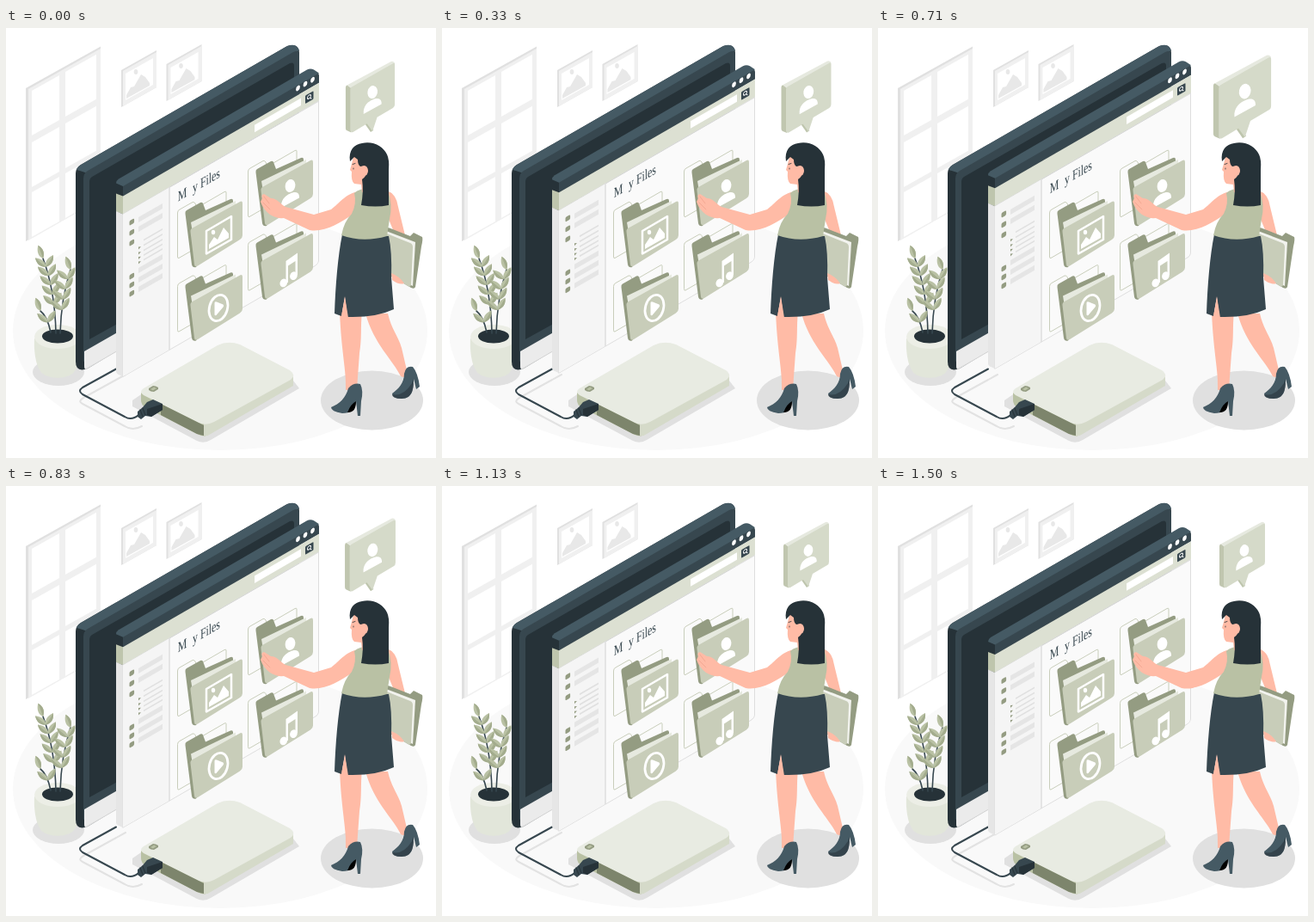
Recreate the animation shown at these times as an HTML page. Size 500 by 500 pixels, loop 1.54 s.

```html
<!DOCTYPE html>
<html lang="en">
<head>
<meta charset="utf-8">
<title>My Files</title>
<style>
  html, body { margin: 0; width: 100%; height: 100%; overflow: hidden; background: #fff; }
  svg { display: block; width: 100vw; height: 100vh; }
  .ink { fill: #263238; } .slate { fill: #37474f; } .steel { fill: #455a64; }
  .sage { fill: #b9c1a4; } .moss { fill: #949c82; } .pale { fill: #c8cdb9; } .cream { fill: #dce0d2; }
  .skin { fill: #ffbba6; } .shade { fill: #e0e0e0; } .mist { fill: #f0f0f0; } .white { fill: #fff; }
  .line { fill: none; stroke-linecap: round; stroke-linejoin: round; }
  text { font: 16.5px "Liberation Serif", serif; fill: #37474f; }
</style>
</head>
<body>
<svg viewBox="0 0 500 500">
  <defs>
    <g id="picture">
      <path class="shade" d="M134 49L175 26V69L134 92Z"/>
      <path class="mist" d="M136 50L175 28V69L136 91Z"/>
      <path class="white" d="M139 53L171 35V66L139 84Z"/>
      <path fill="#e8e8e8" d="M140 82V78L145 69L149 68L157 54L162 57L167 64V67Z"/>
      <ellipse fill="#e8e8e8" cx="151" cy="51" rx="2.3" ry="2.9"/>
    </g>
    <g id="folder">
      <path class="line" stroke="#c3c9b4" stroke-width=".9" d="M214 260L201 267.5Q199.500 268 199.500 266V215Q199.500 212 202 211L217 202.500Q219 202 220 204L222 209L254 190.500Q256 189.500 256 191V206"/>
      <path class="moss" d="M208.500 216Q208 213 210 212L226 203Q228 202 229 204L232 212L261 199Q264 198 264 201V212L221 278Q217 279 216 275Z"/>
      <path fill="#e6e9df" d="M215 226L267 201V210L218 244Z"/>
      <path class="pale" d="M214.500 237Q214 234 217 232.500L272 202Q275 200.500 275 204V241Q275 244 272 246L223 276.500Q219.500 278.500 219 275Z"/>
    </g>
    <g id="person" class="white">
      <ellipse rx="5.800" ry="7.600" transform="rotate(12)"/>
      <path d="M-10.500 25.500V22C-9.500 15 -5 11 0 9C5 6.500 10 7 10.500 12V14Z"/>
    </g>
    <g id="leaf">
      <path fill="#b9c1a4" d="M0 0C3 -5 9 -6 16 -3C11 3 5 3 0 0Z"/>
      <path fill="#a3ac8d" d="M0 0Q8 -1 16 -3C11 3 5 3 0 0Z"/>
    </g>
  </defs>

  <ellipse cx="249" cy="352" rx="241" ry="139" fill="#f9f9f9"/>

  <!-- wall -->
  <path class="shade" d="M23 70L110 21.500V199L23 248Z"/>
  <path class="mist" d="M26 71L110 24V199L26 247Z"/>
  <g id="panes" class="white"></g>
  <use href="#picture"/>
  <use href="#picture" x="52.500" y="-7"/>

  <!-- plant -->
  <ellipse cx="61" cy="400" rx="30" ry="16" class="shade"/>
  <path fill="#e2e6da" d="M33 361C32 380 36 400 46 404Q60 410 74 404C84 400 88 380 87 361Z"/>
  <ellipse cx="60" cy="359" rx="27" ry="14" fill="#eceee6"/>
  <ellipse cx="60" cy="358.500" rx="18" ry="8" class="ink"/>
  <g id="plant" class="line"></g>

  <!-- monitor -->
  <path class="ink" d="M81 169Q81 163 87 159L327 21Q341 17 341 30V240L128 376L95 396Q81 401 81 388Z"/>
  <path class="steel" d="M82 165Q83 161 87 159L327 21Q338 17 341 26L94 169Q90 167 82 165Z"/>
  <path class="slate" d="M90 175Q90 169 95 166L334 28Q341 25 341 31V240L90 388Z"/>
  <path class="ink" d="M97 179Q97 175 100 173L330 41Q335 39 335 44V230L97 362Z"/>
  <path fill="#ebebeb" d="M91 376L140 348V369L95 396Q91 398 91 394Z"/>
  <path class="line" stroke="#d8d8d8" d="M92 397L140 369.500"/>

  <!-- cable -->
  <g class="line">
    <path stroke="#e2e2e2" stroke-width="2" d="M139 403L90 430Q83 434 89 437L138 463Q147 469 158 463"/>
    <path stroke="#37474f" stroke-width="2" d="M128 396.500L89 418Q83 422 89 426L138 452Q146 457 154 450"/>
  </g>

  <g id="browser">
    <path class="ink" d="M128 180L136 184V196.500L128 193Z"/>
    <path fill="#bec5ad" d="M128 193L136 196V217L128 214Z"/>
    <path fill="#e6e6e6" d="M128 213.500L136 217V406L130 403Q128 402 128 400Z"/>
    <g transform="translate(136 182) skewY(-30)">
      <path class="slate" d="M0 0H223Q228 1 228 6V14H0Z"/>
      <path class="cream" d="M0 14H228V35H0Z"/>
      <path fill="#fafafa" stroke="#dedede" d="M0 35H227.500V220Q227.500 224 223 224H0Z"/>
      <path fill="#f5f5f5" d="M0 35H54V223.500H0Z"/>
      <path class="line" stroke="#dedede" stroke-width="1.500" d="M54 35V223.500"/>
      <rect class="white" x="153" y="19.500" width="54" height="8.500"/>
      <rect class="slate" x="212" y="19.500" width="9.500" height="9.500" rx="1"/>
      <path class="line" stroke="#fff" d="M217.500 25L219 27M214.500 23.500a2 2 0 1 1 4 0a2 2 0 1 1 -4 0"/>
      <g class="white">
        <ellipse cx="203.500" cy="6" rx="2.400" ry="3"/>
        <ellipse cx="212" cy="6" rx="2.400" ry="3"/>
        <ellipse cx="220.500" cy="6" rx="2.400" ry="3"/>
      </g>
      <g id="sidebar"></g>
      <g transform="scale(.72 1)"><text x="88.500" y="57">M</text><text x="112.500" y="57">y Files</text></g>
    </g>
    <path class="steel" d="M128 181Q128 178 131 176L350 49Q354 47 358 49L364 53L136 184.500Z"/>
  </g>

  <!-- folders -->
  <use href="#folder"/>
  <use href="#folder" x="82" y="-48"/>
  <use href="#folder" y="85.500"/>
  <use href="#folder" x="82" y="37.500"/>
  <path class="line" stroke="#fff" stroke-width="2.500" d="M233 236L262 219V246L233 262.500Z"/>
  <path class="white" d="M236 257V252L242 243L246 246L253 232L259 239V244Z"/>
  <ellipse class="white" cx="241" cy="237.500" rx="2.200" ry="2.700"/>
  <use href="#person" x="330.500" y="183.500"/>
  <ellipse class="line" stroke="#fff" stroke-width="2.800" cx="247" cy="325.500" rx="10.500" ry="15.500" transform="rotate(16 247 325.500)"/>
  <path class="white" d="M242.500 320Q242.500 317.500 245 318.500L252.500 321.500Q254 323 252.500 324.500L244.500 334Q242.500 335 242.500 333Z"/>
  <path class="white" d="M325.500 271L339 261.500V287H336.500V271L328 276.500V296H325.500Z"/>
  <ellipse class="white" cx="323" cy="296.500" rx="4.200" ry="5" transform="rotate(25 323 296)"/>
  <ellipse class="white" cx="334.500" cy="288" rx="4.200" ry="5" transform="rotate(25 334 288)"/>

  <!-- drive -->
  <path class="shade" d="M147 433L160 424L334 410L341 419L238 479Q230 484 222 480L147 440Z"/>
  <path class="sage" d="M157 424L232 459V474.500Q228 475 222 472L162 441Q157 438 157 433Z"/>
  <path fill="#d5dac9" d="M230 459L334 404V416L238 472Q234 475 230 474.500Z"/>
  <path fill="#e8ebe2" d="M160 427Q154 423 160 419L246 369Q258 363 272 368L330 398Q338 404 331 409L242 458Q232 463 224 459Z"/>
  <path fill="#7d856c" d="M180 437L230 462V474L222 472L180 450Z"/>
  <path class="moss" d="M166 419L171 416Q174 416 177 418V420L172 423Q168 423 166 421Z"/>
  <path class="sage" d="M168 420L172 417.500L175 419L171 421.500Z"/>
  <path class="slate" d="M153 446L159 441L164 435L171 432L182 437V444L169 452L162 451L157 455L153 452Z"/>
  <path class="ink" d="M164 443L182 437V444L169 452L164 450Z"/>
  <path class="line" stroke="#263238" d="M156 444L159 452M159 442L162 450"/>

  <!-- woman -->
  <ellipse cx="425.500" cy="433" rx="59.500" ry="34.500" class="shade"/>
  <path class="skin" d="M418 332H444C448 350 456 358 460 372L467 402Q464 408 459 405C450 386 428 368 418 332Z"/>
  <path class="skin" d="M388 330H414C412 348 414 360 411 378L408 420L395 421C396 398 390 378 388 330Z"/>
  <path class="steel" d="M449 425C456 420 463 413 463 402Q465 392 473 394Q479 401 481 417L477 420L474 408C474 419 473 431 460 431Q449 431 449 425Z"/>
  <path class="ink" d="M449 426Q462 429 472 413L474 408C474 419 473 431 460 431Q449 431 449 426Z" opacity=".55"/>
  <path class="steel" d="M378 441C388 437 395 430 398 419Q404 412 412 414Q416 422 413 434L412 451H409L407 434C405 445 401 448 391 448Q378 446 378 441Z"/>
  <path fill="#000" d="M397 447Q401 437 407 434C407 443 404 447 397 447Z"/>
  <path class="skin" d="M443 189Q454 193 456 208L464 241L455 247L442 215Z"/>
  <path class="moss" d="M441 235Q443 231 447 233L470 242L474 238L484 243Q485 246 483 254L476 301Q475 304 471 302L447 288Z"/>
  <path fill="#f2f3ee" d="M442 236L476 249L473 300L447 287Z"/>
  <path class="pale" d="M440 238L470 250Q473 251 473 255L471 299Q470 302 467 300L446 286Z"/>
  <path class="skin" d="M448 285Q458 289 463 297Q457 299 449 293Z"/>
  <path class="slate" d="M391 240L445 242Q449 260 448 290L451 327Q430 337 397 336L394 313L390 335L382 332C383 300 386 264 391 240Z"/>
  <path class="skin" d="M394 312L398 337L390 335Z"/>
  <path class="skin" d="M414 190C396 190 388 204 378 211L358 217L325 208C318 204 315 198 308 198L300 193Q296 194 298 198L296 202Q299 211 307 217Q315 222 323 221L353 235C370 238 388 227 404 216Q408 203 414 190Z"/>
  <path class="sage" d="M412 188Q430 181 444 189Q450 206 446 222L443 242Q415 250 390 241Q393 225 402 216Q408 204 405 192Q408 189 412 188Z"/>
  <path class="line" stroke="#f0a18c" stroke-width=".7" d="M300 196L306 204M299 203L307 211"/>
  <path class="skin" d="M404 150L402 158L400 165L402 167Q401 178 405 181L413 182L414 191L424 190V158L414 148Z"/>
  <path class="ink" d="M400 155C398 142 405 135 414 134C427 131 439 138 443 147Q446 153 445 165V206Q430 209 413 206Q416 190 414 176Q419 173 420 165Q418 159 412 161Q409 159 409 153L405 150Z"/>
  <ellipse class="skin" cx="416.500" cy="166" rx="4.500" ry="6"/>
  <path class="line" stroke="#263238" stroke-width=".8" d="M403 158.500L406 157.500M404 163V164"/>

  <g id="bubble">
    <path fill="#c0c6af" d="M397 70Q397 68 398.500 67.500L403 70V118.500L398.500 116.500Q397 116 397 114Z"/>
    <path fill="#e6e9df" d="M398.500 67.500L446 42Q448 41 450 43.500L403 71Z"/>
    <path fill="#bec5ad" d="M417 108L424 118L427 116L422 106Z"/>
    <path fill="#d5dac9" d="M402 72Q402 70 404 69L448 44Q450 43 450 45V88Q450 91 448 92L431 102L426 117L420 109L405 118Q402 119 402 116Z"/>
    <use href="#person" transform="translate(426 75) scale(.92)"/>
  </g>
</svg>
<script>
const PERIOD = 1540, LEAD = 38;
const byId = id => document.getElementById(id);
const each = (list, make) => list.map(make).join('');

byId('panes').innerHTML = each([[30, 32], [69, 36]], ([x, w]) => each([0, 60, 118], drop => {
  const y = 73 + drop - (x - 30) * .563, rise = w * .563;
  return `<path d="M${x} ${y}l${w} ${-rise}v52l${-w} ${rise}z"/>`;
}));

byId('sidebar').innerHTML =
  each([50, 62, 74, 113, 123, 133], y => `<rect class="moss" x="7.5" y="${y - 2.8}" width="5.6" height="5.6" rx="1.5"/>`) +
  each([52, 63, 111, 122, 133], y => `<rect fill="#e5e5e5" x="18" y="${y - 3}" width="28" height="6"/>`) +
  each([79, 85, 91, 96.5, 102], y => `<rect fill="#e0e0e0" x="24" y="${y - 1}" width="22" height="1.8"/>`) +
  each([85, 91, 96.5, 102], y => `<path class="moss" d="M18 ${y - 1.5}l3 1.500l-3 1.500z"/>`);

// Each stem is a quadratic curve with pairs of leaves and one at the tip.
function stem([x0, y0, cx, cy, x1, y1], pairs) {
  const leaf = (x, y, angle, flip) =>
    `<use href="#leaf" transform="translate(${x} ${y}) rotate(${angle}) scale(1 ${flip})"/>`;
  let out = `<path stroke="#37474f" stroke-width="1.6" d="M${x0} ${y0}Q${cx} ${cy} ${x1} ${y1}"/>`;
  for (let i = 0; i < pairs; i++) {
    const t = .35 + .65 * i / pairs, s = 1 - t;
    const x = s * s * x0 + 2 * s * t * cx + t * t * x1;
    const y = s * s * y0 + 2 * s * t * cy + t * t * y1;
    out += leaf(x, y, -48, 1) + leaf(x, y, -150, -1);
  }
  return out + leaf(x1, y1, -100, 1);
}
byId('plant').innerHTML =
  stem([58, 355, 57, 305, 43, 268], 5) +
  stem([63, 355, 64, 315, 75, 281], 4) +
  stem([52, 354, 48, 335, 40, 329], 1);

function draw() {
  const u = (performance.now() + LEAD) % PERIOD / PERIOD;
  const lift = 10 * (1 - Math.abs(1 - 2 * u));
  const beat = Math.max(0, Math.min(u * 10, (.3 - u) * 5), Math.min(u - .4, .6 - u) * 10);
  byId('browser').setAttribute('transform', `translate(0 ${-lift})`);
  byId('bubble').setAttribute('transform', `translate(423.5 80) scale(${1 + .31 * beat}) translate(-423.5 -80)`);
  requestAnimationFrame(draw);
}
draw();
</script>
</body>
</html>
```
